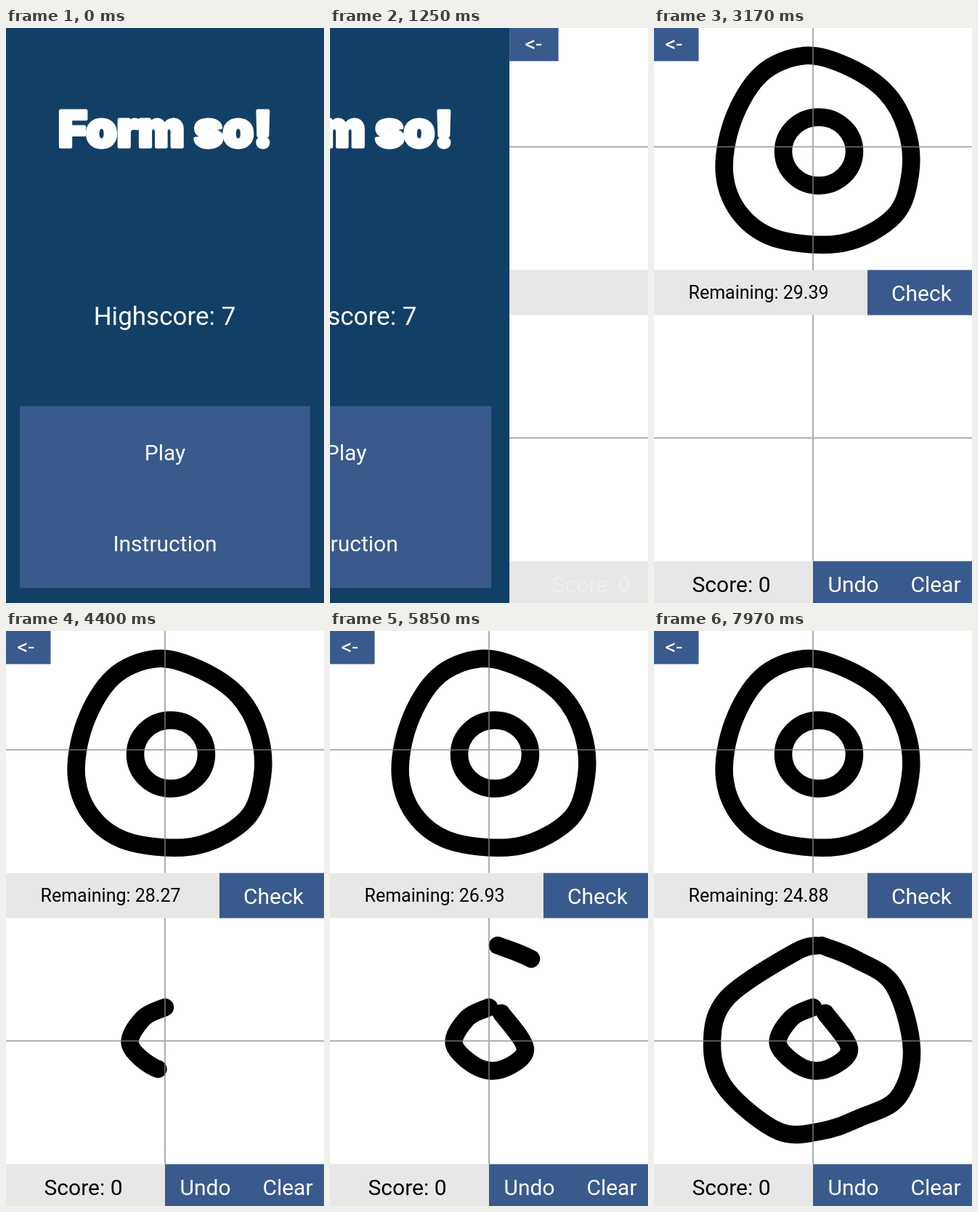
Animation of 438x790 px, one loop 8 s. Source, as an HTML page:

```html
<!DOCTYPE html>
<html lang="en">
<head>
<meta charset="utf-8">
<title>Drawing game</title>
<style>
  html, body { margin: 0; width: 100%; height: 100%; overflow: hidden; background: #fff; }
  svg { display: block; width: 100%; height: 100%; }
  text { font: 30px Roboto, sans-serif; text-anchor: middle; fill: #fff; }
  .title { font: 900 67.5px Inter, sans-serif; stroke: #fff; stroke-width: 5; stroke-linejoin: round; }
  .ink { fill: none; stroke: #000; stroke-width: 24.5; stroke-linecap: round; stroke-linejoin: round; }
  .grid { fill: none; stroke: #7f8794; stroke-opacity: .68; stroke-width: 2; }
  .bar { fill: #e7e7e7; }
  .button { fill: #395a8c; }
  .off { fill: #a8abb0; }
</style>
</head>
<body>
<svg viewBox="0 0 438 790">
  <g id="game">
    <rect x="-6" width="450" height="790" fill="#fff"/>
    <g id="model" class="ink">
      <path id="ring"/>
      <ellipse cx="227" cy="169.5" rx="49" ry="47"/>
    </g>
    <path id="small" class="ink" pathLength="1"/>
    <path id="large" class="ink" pathLength="1"/>
    <path class="grid" d="M219 0V732M-6 163.3H444M-6 563.3H444"/>
    <rect class="bar" x="-6" y="332.5" width="300" height="62"/>
    <rect class="button" x="294" y="332.5" width="150" height="62"/>
    <text id="left" x="47.5" y="372" style="font-size:25px;text-anchor:start;fill:#000"></text>
    <text id="action" x="368.5" y="375"></text>
    <rect class="bar" x="-6" y="732.5" width="225" height="58"/>
    <g id="idle">
      <rect class="bar" x="219" y="732.5" width="225" height="58"/>
      <path class="off" d="M220.5 732.5h109.500v58h-109.500zM332.500 732.500h112v58h-112z"/>
    </g>
    <rect id="live" class="button" x="219" y="732.5" width="225" height="58"/>
    <text id="score" x="106.5" y="775">Score: 0</text>
    <g id="tools">
      <text x="274.5" y="775">Undo</text>
      <text x="388" y="775">Clear</text>
    </g>
    <rect class="button" x="-6" width="67.5" height="45.5"/>
    <text x="27" y="32">&lt;-</text>
  </g>
  <g id="menu">
    <rect x="-6" width="450" height="790" fill="#123f66"/>
    <text class="title" x="219.5" y="163">Form so!</text>
    <text x="218.5" y="407.5" style="font-size:35px">Highscore: 7</text>
    <rect class="button" x="19" y="519.5" width="400" height="250"/>
    <text x="219" y="594">Play</text>
    <text x="219" y="719">Instruction</text>
  </g>
</svg>
<script>
const LOOP = 8000, WIDTH = 450, PLAY_START = 2500;
const SLIDE = { start: 1151, time: 400 };
const SMALL = { id: 'small', start: 3725, time: 1235 };
const LARGE = { id: 'large', start: 5575, time: 2278 };
const PAUSE = 70, PAUSES = [4030, 4870];

const $ = id => document.getElementById(id);
const clamp = (v, max = 1) => Math.min(max, Math.max(0, v));
const progress = (t, { start, time }) => clamp((t - start) / time);
const show = (el, on) => { el.style.display = on ? '' : 'none'; };
const slide = (id, x) => $(id).setAttribute('transform', `translate(${x})`);

// Smooth (Catmull-Rom) curve through a few points.
function setCurve(id, pts, closed) {
  const n = pts.length;
  const at = i => pts[closed ? (i + n) % n : clamp(i, n - 1)];
  const handle = (i, dir) => at(i).map((v, k) => v + dir * (at(i + 1)[k] - at(i - 1)[k]) / 6);
  let d = 'M' + pts[0];
  for (let i = 0; i < (closed ? n : n - 1); i++) {
    d += `C${handle(i, 1)} ${handle(i + 1, -1)} ${at(i + 1)}`;
  }
  $(id).setAttribute('d', d);
}

setCurve('ring', [[207, 38], [265, 52], [319, 88], [348, 140], [353, 200], [331, 258],
  [262, 295], [174, 291], [121, 258], [97, 200], [109, 126], [148, 63]], true);
setCurve('small', [[219, 517], [189, 532], [171, 568], [205, 600], [240, 601], [269, 574], [236, 525]]);
setCurve('large', [[231, 432], [278, 451], [330, 487], [355, 575], [336, 641], [283, 669], [231, 687],
  [171, 687], [100, 630], [80, 570], [100, 505], [195, 441], [231, 432]]);

// Game time stands still during each short hang.
const gameTime = t => PAUSES.reduce((sum, p) => sum - clamp(t - p, PAUSE), t);

function trace(stroke, t) {
  const p = progress(t, stroke), el = $(stroke.id);
  show(el, p > 0);
  el.setAttribute('stroke-dasharray', `${p} 2`);
}

const remaining = t => Math.min(30, 30 - (t - 2540) * .000968).toFixed(2);

function draw(t) {
  const p = progress(t, SLIDE), moved = WIDTH * p * (2 - p);
  slide('menu', -moved);
  slide('game', WIDTH - moved);
  show($('menu'), p < 1);

  const playing = t >= PLAY_START, now = gameTime(t);
  show($('model'), playing);
  show($('live'), playing);
  show($('idle'), !playing);
  $('left').textContent = playing ? 'Remaining: ' + remaining(now) : '';
  $('action').textContent = playing ? 'Check' : 'Start';
  $('score').style.fill = playing ? '#000' : '#efefef';
  $('tools').style.opacity = playing ? 1 : .35;
  trace(SMALL, now);
  trace(LARGE, now);
}

const start = performance.now();
function tick() {
  draw((performance.now() - start) % LOOP);
  requestAnimationFrame(tick);
}
tick();
</script>
</body>
</html>
```
